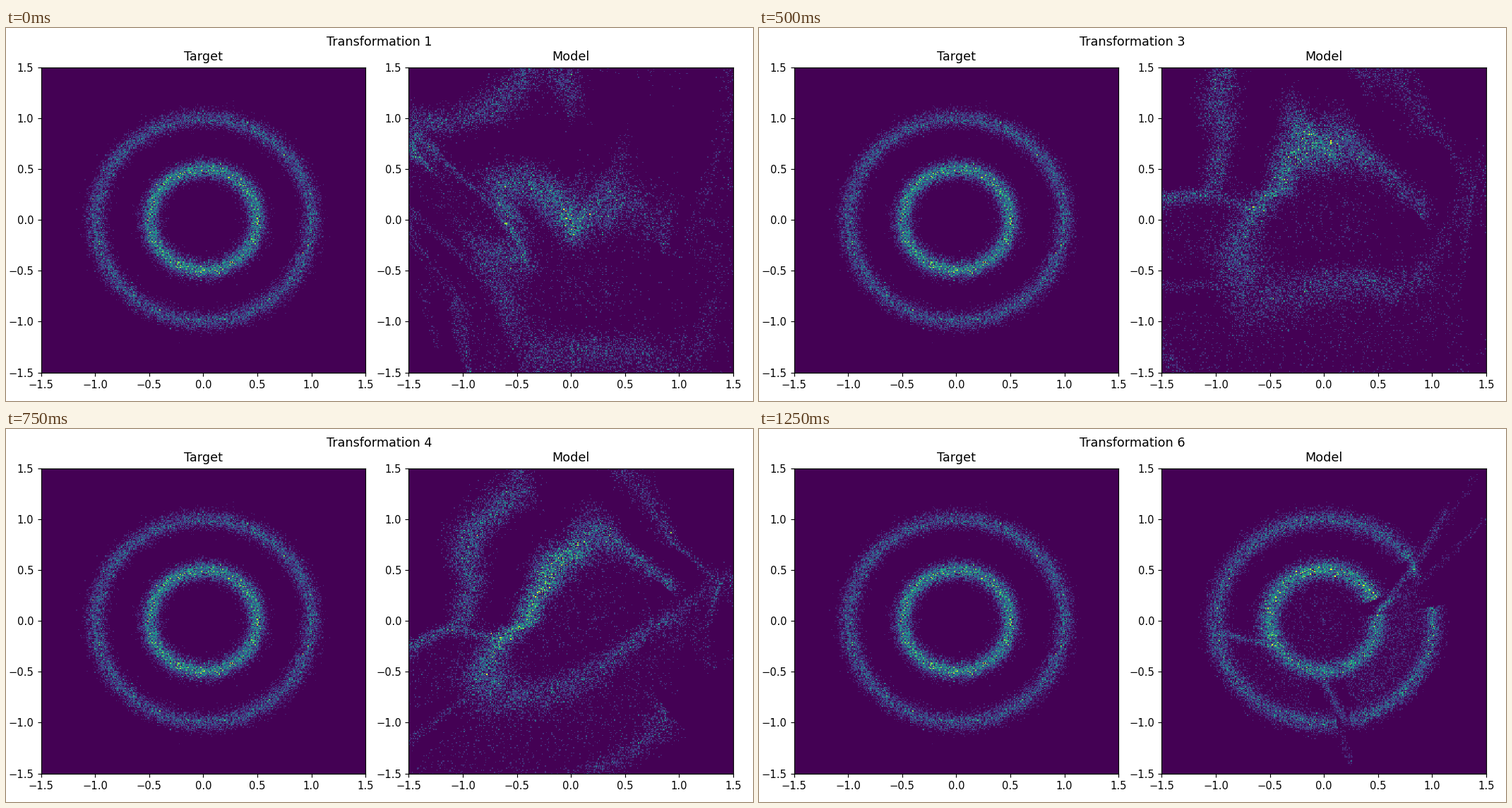
A matplotlib script that plays this animation: 1058x529 px, repeating every 1500 ms.

```python
import numpy as np
import matplotlib.pyplot as plt
from matplotlib.animation import FuncAnimation

W, H, DPI = 1058, 529, 105.8
TOP, BOTTOM, PANEL_W = 55.55, 488.6, 459.5
LIM, BINS, POINTS = 1.5, 300, 32000
KNOTS = np.linspace(-LIM, LIM, 9)
rng = np.random.default_rng(7)


def arc(n, r, start, stop, spread=0.05):
    a = np.radians(rng.uniform(start, stop, n))
    r = r + rng.normal(0, spread, n)
    return np.c_[r * np.cos(a), r * np.sin(a)]


def line(n, start, stop, spread=0.025):
    t = rng.random((n, 1))
    return (1 - t) * start + t * np.array(stop) + rng.normal(0, spread, (n, 2))


def stream(n, rise, reach):
    """Thin jet that leaves the inner ring, thinning out with distance."""
    x = reach * rng.random(n) ** 1.3
    return np.c_[x + 0.5, 0.1 + rise * x**1.2] + rng.normal(0, 0.022, (n, 2))


def target():
    return np.vstack([arc(POINTS // 2, r, 0, 360) for r in (1, 0.5)])


def fitted():
    """Final model: broken rings joined by threads, jets and dust."""
    rings = [arc(10800, 1, 38, 277, 0.056), arc(4000, 1.01, 284, 368),
             arc(8600, 0.51, 24, 200, 0.06), arc(6200, 0.5, 200, 367, 0.057)]
    threads = [line(450, (-0.95, -0.12), (-0.4, -0.26)),
               line(400, (0, -0.6), (0.22, -1.02)),
               line(90, (0.13, -1.03), (0.25, -1.4)),
               line(250, (0.78, 0.66), (0.86, 0.42))]
    jets = [stream(700, 1.7, 0.65), stream(200, 1.5, 0.9), stream(280, 0.9, 1)]
    dust = [arc(1300, 0.77, -72, 20, 0.12), arc(450, 0.25, 0, 360, 0.12),
            arc(350, 0.75, 185, 260, 0.12)]
    return np.vstack(rings + threads + jets + dust)


def undo(points, axis, scale, shift):
    """Stretch and shift one axis by amounts that depend on the other."""
    points = points.copy()
    other = points[:, 1 - axis]
    points[:, axis] *= np.interp(other, KNOTS, scale)
    points[:, axis] += np.interp(other, KNOTS, shift)
    return points


def density(points):
    return np.histogram2d(*points.T, BINS, [(-LIM, LIM)] * 2)[0].T


def show(img, grid):
    img.set_data(grid)
    img.set_clim(0, np.quantile(grid, 0.9999))


def panel(left, title, grid):
    ax = fig.add_axes([left / W, 1 - BOTTOM / H, PANEL_W / W, (BOTTOM - TOP) / H])
    img = ax.imshow(grid, origin="lower", extent=(-LIM, LIM, -LIM, LIM),
                    aspect="auto", cmap="viridis", interpolation="nearest")
    show(img, grid)
    ticks = np.linspace(-LIM, LIM, 7)
    ax.set_xticks(ticks)
    ax.set_yticks(ticks)
    ax.set_title(title, pad=6.4)
    return img


# Scale and shift at the knots for each layer, from the last to the first.
LAYERS = [
    ((1.2, 1.2, 1.02, 1.04, 1.28, 2.15, 2.5, 1.4, 1.4),
     (0.07, 0.07, 0.06, 0.08, 0.02, 0.04, -0.75, -1.3, -1.4)),
    ((2.4, 2.4, 1.9, 1.46, 1.22, 1.28, 1.25, 1.45, 1.94),
     (-2.2, -1.65, -0.95, -0.33, 0.22, 0.32, -0.02, -0.25, -0.67)),
    ((0.92, 1.1, 1.6, 1.45, 1.05, 1, 1.65, 2.25, 2.2),
     (0.45, 0.33, 0.4, 0.33, 0.02, -0.2, -0.55, -0.6, -0.45)),
    ((0.9, 0.9, 1.05, 1.2, 0.8, 1.25, 1.18, 1.04, 0.93),
     (0.2, 0.4, 0.2, 0.2, 0.12, -0.18, 0.03, 0.33, 0.42)),
    ((0.9, 0.88, 1.03, 1.2, 0.85, 1.1, 1.5, 2.05, 2.2),
     (0.7, 0.33, 0, -0.42, -0.7, -0.62, -0.42, -0.1, 0.4)),
]

clouds = [fitted()]
for k, (scale, shift) in enumerate(LAYERS):
    clouds.append(undo(clouds[-1], (k + 1) % 2, scale, shift))
stages = [density(cloud) for cloud in reversed(clouds)]

plt.rcParams["font.family"] = "DejaVu Sans"
fig = plt.figure(figsize=(W / DPI, H / DPI), dpi=DPI, facecolor="white")
panel(49.6, "Target", density(target()))
model = panel(570.4, "Model", stages[0])
heading = fig.suptitle("Transformation 1")


def draw(i):
    show(model, stages[i])
    heading.set_text(f"Transformation {i + 1}")
    return model, heading


anim = FuncAnimation(fig, draw, frames=len(stages), interval=250,
                     repeat=True, repeat_delay=0, blit=False)
plt.show()
```
